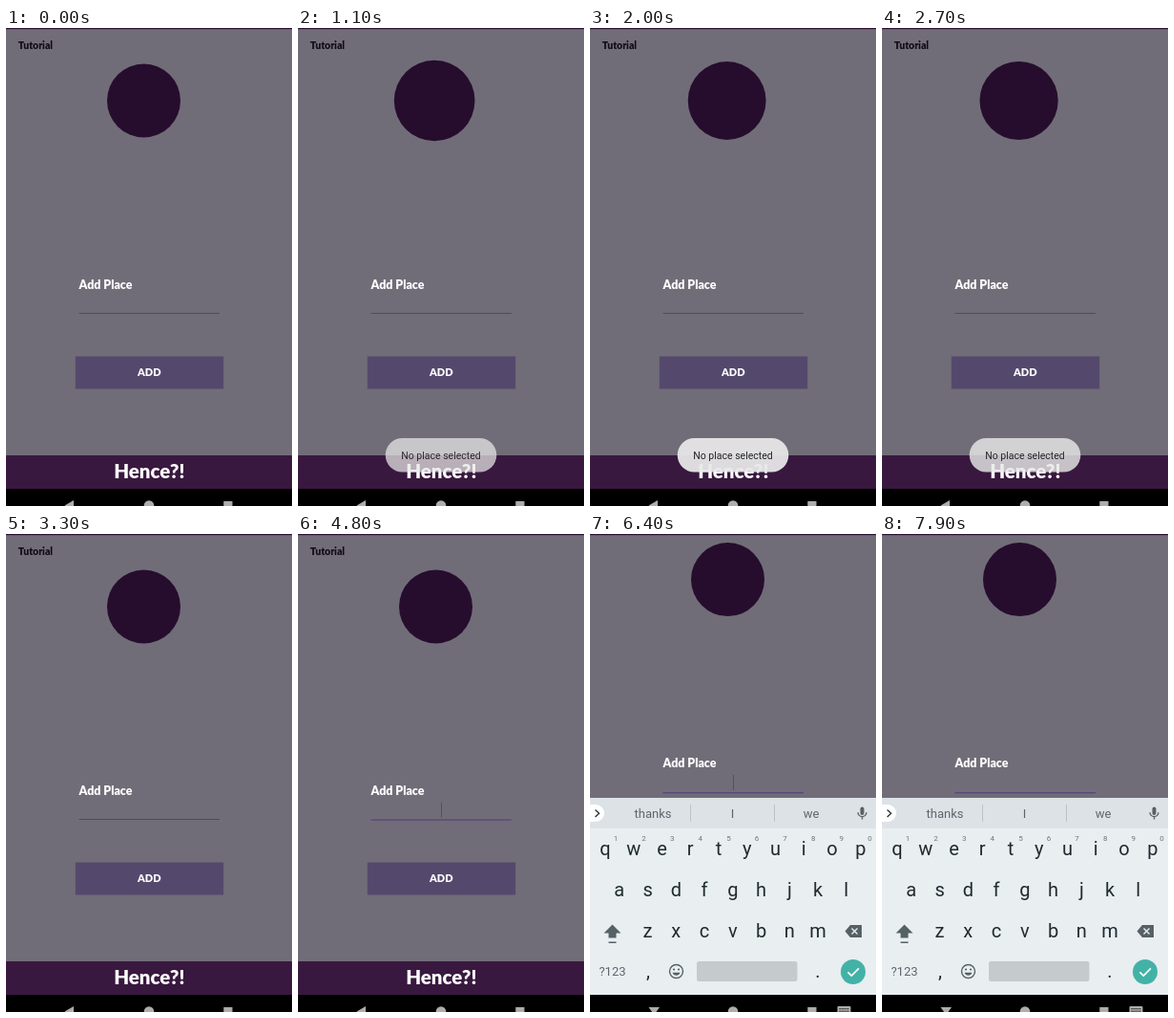
An HTML page that plays this animation: 300x500 px, repeating every 8000 ms.

```html
<!DOCTYPE html>
<html lang="en">
<head>
<meta charset="utf-8">
<title>Add Place</title>
<style>
html, body { margin: 0; width: 100%; height: 100%; overflow: hidden; background: #716d78; }
svg { display: block; width: 100vw; height: 100vh; }
text { text-anchor: middle; font-family: Roboto, sans-serif; }
.brand { font-family: Lato, "Open Sans", sans-serif; font-weight: 900; fill: #fff; }
.left { text-anchor: start; }
.key { font-size: 20px; fill: #1f2b30; }
.digit { font-size: 8px; fill: #6b767b; }
.word { font-size: 13px; fill: #5c676d; }
.ink { fill: #566166; }
.line { fill: none; stroke: #566166; stroke-width: 1.4; }
</style>
</head>
<body>
<svg viewBox="0 0 300 500">
  <rect width="300" height="500" fill="#716d78"/>

  <g id="page">
    <text class="brand left" x="12.8" y="22" font-size="10.4" style="fill:#120c16">Tutorial</text>
    <circle id="mark" cx="144.5" cy="76" r="38.5" fill="#260d2e"/>
    <text class="brand left" x="76.5" y="272.5" font-size="12.4">Add Place</text>
    <rect id="rule" x="76.5" width="147.5"/>
    <rect id="caret" x="150" y="280.5" width="1" height="16" fill="#54487a"/>
    <rect x="72.8" y="343.5" width="155.4" height="34" fill="#54496c"/>
    <text class="brand" x="150.3" y="364.3" font-size="11">ADD</text>
    <rect y="447" width="300" height="35" fill="#39183f"/>
    <text class="brand" x="150.3" y="471" font-size="20.5">Hence?!</text>
    <rect y="482" width="300" height="50"/>
  </g>

  <rect width="300" height="1.2" fill="#2c0f38"/>
  <rect y="482" width="300" height="18"/>

  <g id="board">
    <rect y="276" width="300" height="206" fill="#e9eef1"/>
    <rect y="276" width="300" height="32" fill="#dde2e6"/>
    <path d="M0 283h6a9 9 0 0 1 0 18h-6z" fill="#fff"/>
    <path class="line" d="M5.5 288.5l4 3.7l-4 3.7" style="stroke:#2b363b"/>
    <path d="M105.5 283v18M193.5 283v18" stroke="#bcc3c7"/>
    <g transform="translate(285.5 292)">
      <rect class="ink" x="-2" y="-6.5" width="4" height="8.5" rx="2"/>
      <path class="line" d="M-4.4 -.8a4.4 4.4 0 0 0 8.8 0M0 3.5v3"/>
    </g>
    <g id="keys"></g>
    <path class="ink" d="M23.5 408.5l9 9h-5v5h-8v-5h-5zM19.5 426.5h8v1.4h-8z"/>
    <path class="ink" d="M273 409h12v13h-12l-5.5-6.5z"/>
    <path class="line" d="M274.5 412.5l6 6m0-6l-6 6" style="stroke:#e9eef1"/>
    <circle class="line" cx="90.5" cy="457.5" r="7"/>
    <circle class="ink" cx="88" cy="455.5" r="1.1"/>
    <circle class="ink" cx="93" cy="455.5" r="1.1"/>
    <path class="ink" d="M86.5 458.8h8a4.2 4.2 0 0 1-8 0z"/>
    <rect x="112" y="447" width="105.5" height="21" rx="2.5" fill="#c5cacd"/>
    <circle cx="276" cy="458" r="13" fill="#43b2a6"/>
    <path d="M270.5 458.3l3.8 3.8l7.6-7.8" fill="none" stroke="#fff" stroke-width="1.7"/>
  </g>

  <g id="nav" fill="#adadad">
    <path id="back" d="M61.5 499.5l9.5-5.5v11z"/>
    <circle cx="150" cy="499.5" r="5.3"/>
    <rect x="228.3" y="495" width="9.2" height="9.2"/>
    <g id="typing">
      <path d="M61.5 495h11.5l-5.75 8z"/>
      <rect x="259.5" y="494" width="14" height="9" rx="1"/>
      <path d="M261.5 496.7h10M261.5 499.2h10" stroke="#000" stroke-dasharray="1.3 .8"/>
    </g>
  </g>

  <g id="toast">
    <rect x="91.7" y="429" width="116.6" height="35.5" rx="17.75" fill="#e8e8e8" fill-opacity=".94"/>
    <text x="150" y="450.7" font-size="10.5" fill="#242424">No place selected</text>
  </g>
</svg>

<script>
const LOOP = 8000;
const $ = id => document.getElementById(id);
const [page, mark, rule, caret, board, nav, back, typing, toast] =
  ['page', 'mark', 'rule', 'caret', 'board', 'nav', 'back', 'typing', 'toast'].map($);

function label(str, x, y, cls) {
  const el = document.createElementNS('http://www.w3.org/2000/svg', 'text');
  el.setAttribute('x', x);
  el.setAttribute('y', y);
  el.setAttribute('class', cls);
  el.textContent = str;
  $('keys').append(el);
}

function keyRow(chars, x, y) {
  [...chars].forEach((c, i) => label(c, x + i * 29.75, y, 'key'));
}

keyRow('qwertyuiop', 16, 336);
keyRow('asdfghjkl', 30.8, 378.5);
keyRow('zxcvbnm', 60.5, 421.5);
[...'1234567890'].forEach((c, i) => label(c, 27 + i * 29.6, 321, 'digit'));
label('thanks', 66, 297, 'word');
label('I', 149.5, 297, 'word');
label('we', 232, 297, 'word');
label('?123', 23.5, 462, 'word');
label(',', 61, 463.5, 'key');
label('.', 239, 463.5, 'key');

// Linear interpolation through [time, value] pairs
function track(steps, t) {
  if (t <= steps[0][0]) return steps[0][1];
  for (let i = 1; i < steps.length; i++) {
    const [t0, v0] = steps[i - 1], [t1, v1] = steps[i];
    if (t < t1) return v0 + (v1 - v0) * (t - t0) / (t1 - t0);
  }
  return steps[steps.length - 1][1];
}

const PAN = [[5050, 0], [5100, -18], [5200, -27], [5300, -28], [5400, -28.4]];
const SLIDE = [[5050, 60], [5100, 42], [5200, 19.5], [5300, 6], [5400, 0]];
const BOARD_FADE = [[5050, 0], [5100, 0.4], [5200, 0.72], [5300, 0.94], [5400, 1]];
const TOAST_FADE = [[760, 0], [900, 0.35], [1100, 0.77], [1300, 0.95], [1550, 1],
  [2600, 1], [2750, 0.8], [3000, 0.35], [3250, 0]];
const PULSE = { from: 855, to: 3300, period: 500, grow: 0.1 };

function pulse(t) {
  if (t < PULSE.from || t >= PULSE.to) return 1;
  const phase = (t - PULSE.from) / PULSE.period;
  return 1 + PULSE.grow * (1 - Math.cos(phase * 2 * Math.PI)) / 2;
}

function caretOn(t) {
  if (t < 4800) return false;
  if (t < 5400) return true;
  return t >= 6400 && Math.floor((t - 6400) / 500) % 2 === 0;
}

const show = (el, on) => el.setAttribute('visibility', on ? 'visible' : 'hidden');

function draw(t) {
  const s = pulse(t), focus = t >= 4800, open = t >= 5100;
  page.setAttribute('transform', `translate(0 ${track(PAN, t)})`);
  mark.setAttribute('transform', `translate(158 76) scale(${s}) translate(-158 -76)`);
  rule.setAttribute('y', focus ? 298.4 : 298);
  rule.setAttribute('height', focus ? 1.3 : 1);
  rule.setAttribute('fill', focus ? '#54487a' : '#504b56');
  show(caret, caretOn(t));
  board.setAttribute('transform', `translate(0 ${track(SLIDE, t)})`);
  board.setAttribute('opacity', track(BOARD_FADE, t));
  nav.setAttribute('fill', t >= 5100 && t < 5300 ? '#e4e4e4' : '#adadad');
  toast.setAttribute('opacity', track(TOAST_FADE, t));
  show(back, !open);
  show(typing, open);
}

const start = performance.now();
function tick() {
  draw((performance.now() - start) % LOOP);
  requestAnimationFrame(tick);
}
tick();
</script>
</body>
</html>
```
